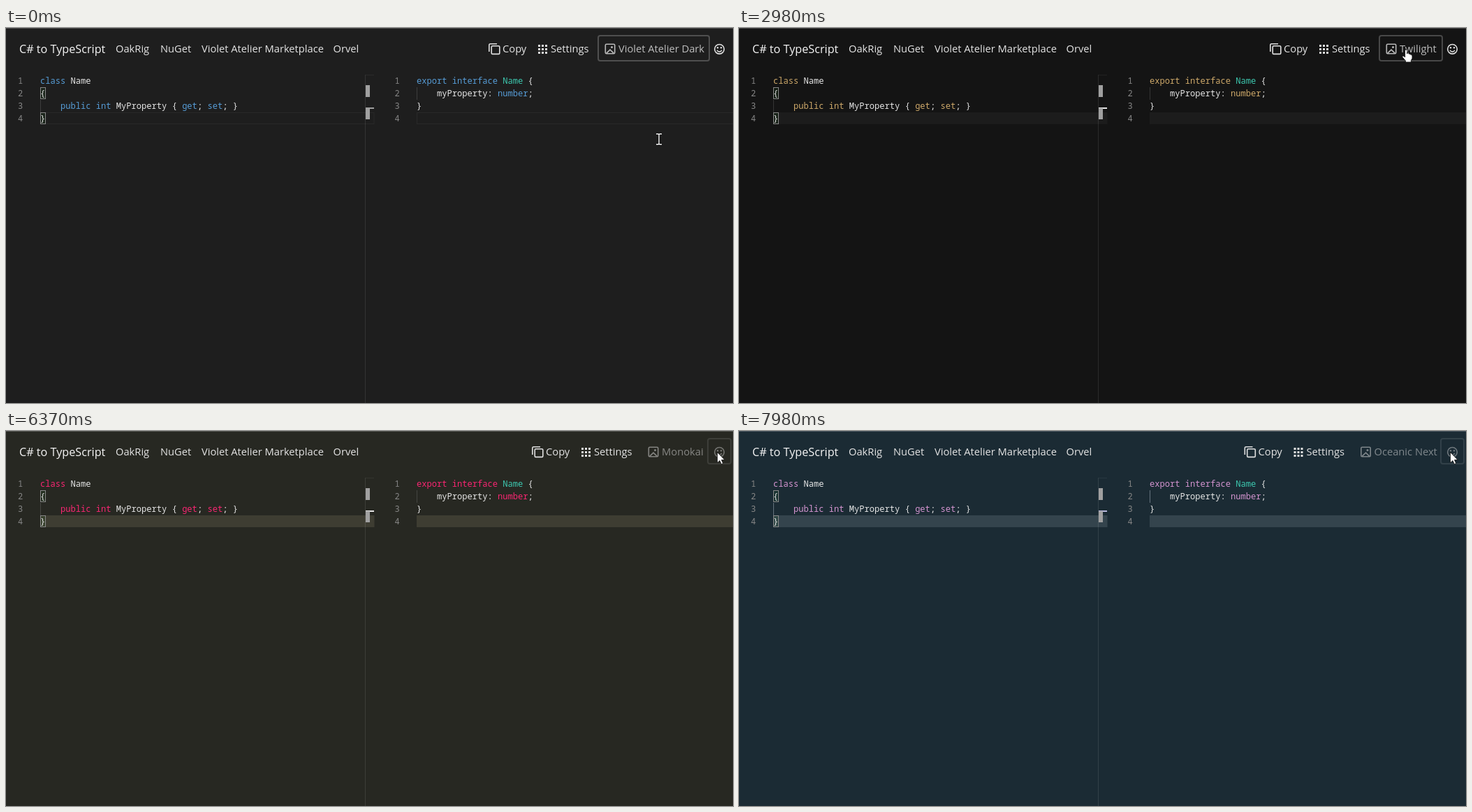
Write an HTML page that moves like this. It is 1041 px wide and 538 px high and loops after 8000 ms.

```html
<!DOCTYPE html>
<html lang="en">
<head>
<meta charset="utf-8">
<title>C# to TypeScript themes</title>
<style>
html, body { margin: 0; width: 100%; height: 100%; overflow: hidden; }
svg { display: block; width: 1041px; height: 538px; background: var(--bg); }
text { font: 14.7px "Open Sans", "Noto Sans", sans-serif; fill: #e4e4e4; white-space: pre; }
.title { font-size: 16.2px; fill: #f6f6f6; }
.code text { font: 500 12.09px "Noto Sans Mono", monospace; fill: #e6e6e6; }
.code .kw { fill: var(--kw); }
.code .type { fill: #3dc9b0; }
.code .num { fill: #858585; font-weight: 400; }
.line { fill: var(--line); stroke: var(--edge); }
.icon { fill: none; stroke: #e0e0e0; stroke-width: 1.6; }
.icon .solid { fill: #e0e0e0; stroke: none; }
.tip text { font-size: 11.2px; fill: #333; }
.frame { fill: none; stroke: #fff; stroke-width: 2; }
</style>
</head>
<body>
<svg id="stage" viewBox="0 0 1041 538">
  <rect width="1041" height="1" fill="#fff" fill-opacity=".2"/>
  <text class="title" x="19" y="35.5">C# to TypeScript</text>
  <text x="157" y="35">OakRig</text>
  <text x="221" y="35">NuGet</text>
  <text x="280" y="35">Violet Atelier Marketplace</text>
  <text x="468.5" y="35">Orvel</text>

  <g id="tools">
    <g class="icon">
      <path d="M-156.2 34V24.5q0-1.7 1.7-1.7H-145"/>
      <rect x="-152.8" y="25.8" width="11.6" height="11.6" rx="1.5"/>
    </g>
    <text x="-137" y="35">Copy</text>
    <g id="dots" fill="#e0e0e0"></g>
    <text x="-68" y="35">Settings</text>
    <g id="theme">
      <g class="icon">
        <rect x="10.3" y="23.3" width="13.4" height="13.4" rx="1.5"/>
        <path d="M11.8 36.2L17 31.2L22.2 36.2"/>
        <circle class="solid" cx="19.5" cy="27.6" r="1.5"/>
      </g>
      <text id="name" x="29" y="35"></text>
    </g>
  </g>
  <rect id="themeFrame" class="frame" y="11" height="36" rx="3" stroke-opacity=".22"/>
  <g id="smile" class="icon">
    <circle cx="1021.5" cy="30.3" r="6.8"/>
    <circle class="solid" cx="1019" cy="28.3" r="1.2"/>
    <circle class="solid" cx="1024" cy="28.3" r="1.2"/>
    <path d="M1018 32Q1021.5 36.3 1025 32"/>
  </g>
  <rect id="smileFrame" class="frame" x="1005" y="11" width="33" height="36" rx="3" stroke-opacity=".1"/>

  <rect class="line" x="49.5" y="121.5" width="477.5" height="16"/>
  <rect class="line" x="588.5" y="121.5" width="460" height="16"/>
  <path d="M514.5 67V538" stroke="#fff" stroke-opacity=".1"/>
  <path d="M515 67.5H527" stroke="#fff" stroke-opacity=".06"/>
  <path d="M49.5 103V121M588.5 85V103" stroke="var(--guide)"/>
  <path d="M515 115H527" stroke="var(--mark)" stroke-width="2"/>
  <path d="M515 82h6v17h-6zM515 115h6v16h-6z" fill="#a0a0a0"/>
  <g fill="#006400" fill-opacity=".1" stroke="#888">
    <rect x="49.5" y="85.5" width="7" height="16"/>
    <rect x="49.5" y="121.5" width="7" height="16"/>
  </g>
  <g id="code" class="code"></g>

  <g id="tip" class="tip">
    <rect x=".5" y="50.5" width="85" height="20" fill="#fff" stroke="#767676"/>
    <text id="tipText" x="5" y="65"></text>
  </g>

  <g id="beam" fill="none">
    <path d="M-4-7.5H-1L0-6.5L1-7.5H4M0-6.5V6.5M-4 7.5H-1L0 6.5L1 7.5H4" stroke="#000" stroke-width="3"/>
    <path d="M-4-7.5H-1L0-6.5L1-7.5H4M0-6.5V6.5M-4 7.5H-1L0 6.5L1 7.5H4" stroke="#fff" stroke-width="1.4"/>
  </g>
  <path id="hand" fill="#fff" stroke="#111" stroke-width=".9"
    d="M-3.4 1.5Q-3.4 0-1.8 0T-.2 1.5V6Q1-.2 2.2 6.2Q3.8 5.8 4.4 7Q6.8 6.6 7 9V12.5L5.4 15.5V18H-2.6V16L-7 10.8Q-7.8 9-6 9Q-4.7 9.2-3.4 11Z"/>
  <path id="arrow" fill="#fff" stroke="#111" stroke-width=".8"
    d="M0 0V15.2L3.5 12L5.8 17L8.2 16L6 11H10.6Z"/>
</svg>
<script>
const LOOP = 8000;
const $ = id => document.getElementById(id);
const NS = "http://www.w3.org/2000/svg";

function add(parent, tag, attrs, text = "") {
  const el = document.createElementNS(NS, tag);
  for (const key in attrs) el.setAttribute(key, attrs[key]);
  el.textContent = text;
  parent.append(el);
}

for (let i = 0; i < 9; i++)
  add($("dots"), "rect", { x: -86 + i % 3 * 5, y: 24 + Math.floor(i / 3) * 5, width: 3, height: 3 });

// Each part is [column, text, class].
const left = [
  [[0, "class", "kw"], [6, "Name"]],
  [[0, "{"]],
  [[4, "public", "kw"], [11, "int", "kw"], [15, "MyProperty"], [26, "{"], [28, "get", "kw"], [31, ";"],
   [33, "set", "kw"], [36, ";"], [38, "}"]],
  [[0, "}"]]
];
const right = [
  [[0, "export", "kw"], [7, "interface", "kw"], [17, "Name", "type"], [22, "{"]],
  [[4, "myProperty:"], [16, "number", "kw"], [22, ";"]],
  [[0, "}"]],
  []
];

function writeCode(lines, x, numberX) {
  lines.forEach((parts, row) => {
    const y = 80 + row * 18;
    add($("code"), "text", { x: numberX, y, class: "num" }, row + 1);
    for (const [col, text, cls = ""] of parts)
      add($("code"), "text", { x: x + col * 7.255, y, class: cls }, text);
  });
}
writeCode(left, 49, 17);
writeCode(right, 588, 556.5);

// Start time, name, left edge of the theme button, background, keyword, current line.
const themes = [
  [0, "Violet Atelier Dark", 848, "#1e1e1e", "#569cd6", "none"],
  [1970, "Oceanic Next", 880.5, "#1b2b34", "#d494d0", "#34444d"],
  [2500, "Twilight", 917, "#141414", "#cda869", "#1c1c1c"],
  [3210, "Clouds Midnight", 860, "#191919", "#927c5d", "#1f1f1f"],
  [3690, "Merbivore", 900.5, "#161616", "#fc6f09", "#333435"],
  [4240, "Monokai", 910, "#272822", "#f92672", "#3e3d32"],
  [6460, "Idle Fingers", 888, "#323232", "#cc7833", "#353637"],
  [6710, "Tomorrow Night", 860, "#1d1f21", "#b294bb", "#282a2e"],
  [7110, "Space Gray", 895, "#2b303b", "#b48ead", "#343d46"],
  [7420, "Nord", 934.5, "#2e3440", "#81a1c1", "#3b4252"],
  [7730, "Cobalt2", 914, "#193549", "#ff9d00", "#1f4662"],
  [7980, "Oceanic Next", 880.5, "#1b2b34", "#d494d0", "#34444d"]
];

const show = (id, on) => $(id).setAttribute("visibility", on ? "visible" : "hidden");
const move = (id, x, y) => $(id).setAttribute("transform", `translate(${x} ${y})`);

// Progress from 0 to 1 in equal jumps, the first at start and the last at end.
function jumps(t, start, end, count) {
  if (t < start) return 0;
  return Math.min(count, Math.floor((t - start) / (end - start) * (count - 1)) + 1) / count;
}

function setTheme([, name, x, bg, kw, line]) {
  const plain = line === "none";
  const oceanic = name === "Oceanic Next";
  const vars = {
    bg, kw, line,
    edge: plain ? "#292929" : line,
    guide: oceanic ? "#65737e" : "#ffffff24",
    mark: plain ? "#a0a0a0" : oceanic ? "#b8b8dc" : "#e4e4e4"
  };
  for (const key in vars) $("stage").style.setProperty("--" + key, vars[key]);
  $("name").textContent = name;
  move("tools", x, 0);
  $("themeFrame").setAttribute("x", x);
  $("themeFrame").setAttribute("width", 1007 - x);
}

function setPointer(t, random) {
  const rise = jumps(t, 230, 540, 5);
  const eased = rise * rise * (3 - 2 * rise);
  const x = 935 + 22 * eased + 63 * jumps(t, 4740, 4890, 3);
  const y = 159.5 - 128.5 * eased;
  const overCode = y > 66;
  show("beam", overCode);
  show("hand", !overCode && !random);
  show("arrow", random);
  move("beam", x, y);
  move("hand", x, y);
  move("arrow", 1018.5, 30.5);
}

let shown;
function draw(t) {
  const theme = themes.findLast(item => t >= item[0]);
  if (theme !== shown) setTheme(shown = theme);

  const random = t >= 6210;
  $("theme").setAttribute("opacity", random ? .5 : .8);
  $("smile").setAttribute("opacity", random ? .42 : 1);
  show("themeFrame", !random);
  show("smileFrame", random);

  const next = t >= 1090 && t < 1780;
  show("tip", next || t >= 5350 && !random);
  move("tip", next ? 955 : 1018, 0);
  $("tipText").textContent = next ? "Set next theme" : "Set random theme";
  setPointer(t, random);
}

const start = performance.now();
function tick() {
  draw((performance.now() - start) % LOOP);
  requestAnimationFrame(tick);
}
tick();
</script>
</body>
</html>
```
